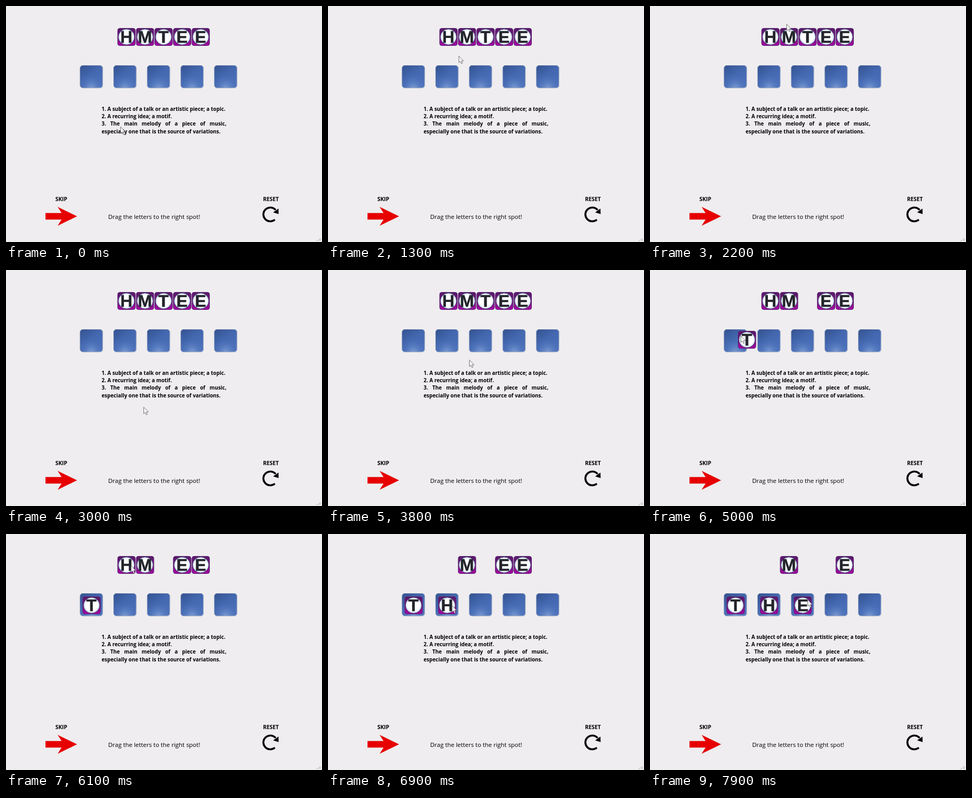
Write an HTML page that moves like this. It is 600 px wide and 450 px high and loops after 8 s.

```html
<!DOCTYPE html>
<html lang="en">
<head>
<meta charset="utf-8">
<title>Letter drag game</title>
<style>
  html, body { margin: 0; width: 100%; height: 100%; overflow: hidden; background: #efedef; }
  body { position: relative; font-family: "Open Sans", "Noto Sans", sans-serif; color: #000; }
  svg { position: absolute; left: 0; top: 0; display: block; }
  .clues { position: absolute; left: 181.5px; top: 189px; width: 237px; font-weight: 700; font-size: 9.9px; line-height: 14.2px; white-space: nowrap; }
  .wide { text-align: justify; text-align-last: justify; white-space: normal; }
  .label { font-weight: 700; font-size: 10.4px; text-anchor: middle; }
  .hint { font-size: 11.46px; }
  .glyph { font: 700 32px "Liberation Sans", Arial, sans-serif; text-anchor: middle; fill: #22252b; stroke: #22252b; stroke-width: .5; }
</style>
</head>
<body>
<svg width="600" height="450" viewBox="0 0 600 450">
  <defs>
    <linearGradient id="blue" x1="0" y1="0" x2=".7" y2="1">
      <stop offset="0" stop-color="#34528f"/>
      <stop offset=".5" stop-color="#4468b0"/>
      <stop offset="1" stop-color="#4a6fb9"/>
    </linearGradient>
    <radialGradient id="shine" cx=".5" cy="1" r=".62">
      <stop offset="0" stop-color="#86a3d8" stop-opacity=".85"/>
      <stop offset=".45" stop-color="#6488c8" stop-opacity=".5"/>
      <stop offset="1" stop-color="#4a6fb9" stop-opacity="0"/>
    </radialGradient>
    <linearGradient id="rim" x1="0" y1="0" x2="1" y2="1">
      <stop offset="0" stop-color="#5d76a8"/>
      <stop offset="1" stop-color="#9aabc9"/>
    </linearGradient>
    <linearGradient id="purple" x1="0" y1="0" x2="0" y2="1">
      <stop offset="0" stop-color="#571a68"/>
      <stop offset=".5" stop-color="#7c0c84"/>
      <stop offset="1" stop-color="#a207a2"/>
    </linearGradient>
    <radialGradient id="disc">
      <stop offset=".72" stop-color="#fff"/>
      <stop offset=".9" stop-color="#dfe9f6"/>
      <stop offset="1" stop-color="#9db4d6"/>
    </radialGradient>
    <g id="slot">
      <rect x=".5" y=".5" width="43.5" height="43.5" rx="5" fill="#c9ced9"/>
      <rect x=".5" y=".5" width="42.5" height="42.5" rx="5" fill="url(#blue)"/>
      <rect x=".5" y=".5" width="42.5" height="42.5" rx="5" fill="url(#shine)" stroke="url(#rim)"/>
    </g>
    <g id="tile">
      <rect x=".5" y=".5" width="33.5" height="33" rx="4" fill="url(#purple)" stroke="#5a2a72"/>
      <ellipse cx="17.2" cy="17" rx="15.5" ry="15.2" fill="url(#disc)" stroke="#43305f" stroke-width=".9"/>
    </g>
  </defs>

  <g id="slots"></g>
  <g id="tiles"></g>

  <text class="label" x="105" y="372.3">SKIP</text>
  <path d="M75 394.8H105.5L98 383L135 401L98 419L105.5 407.2H75Z" fill="#e60000"/>
  <text class="hint" x="194" y="406">Drag the letters to the right spot!</text>
  <text class="label" x="503" y="372.3">RESET</text>
  <path d="M510.5 407.4A13.2 13.2 0 1 1 512 388.9" fill="none" stroke="#000" stroke-width="3.6"/>
  <path d="M517.3 386.2L517.6 396.8L507.3 393.6Z"/>

  <path d="M596 443v5M593 446h5M590 447.5h3" stroke="#aaa9aa" stroke-width="1.6" stroke-dasharray="1.5 1.5"/>
</svg>
<div class="clues">
  <div>1. A subject of a talk or an artistic piece; a topic.</div>
  <div>2. A recurring idea; a motif.</div>
  <div class="wide">3. The main melody of a piece of music,</div>
  <div>especially one that is the source of variations.</div>
</div>
<svg width="600" height="450" viewBox="0 0 600 450">
  <path id="cursor" d="M.5 .5V13L3.3 10.4L5.3 15L7.4 14.1L5.4 9.7H9.3Z" fill="#fafafa" stroke="#555" stroke-width=".8"/>
</svg>
<script>
const LOOP = 8000, STEP = 100;
const $ = id => document.getElementById(id);
const slotX = i => 140.3 + i * 63.75;
const homeX = i => 211.5 + i * 35.25;
const HOME_Y = 42, SLOT_Y = 113;

// Pointer stops: time, x, y
const stops = [
  [0, 217, 230], [600, 231, 205], [1300, 248, 95], [1900, 240, 64],
  [2300, 262, 28], [3000, 261, 261], [3800, 268, 171], [4300, 287, 51],
  [4500, 287, 51], [5000, 172, 125], [5200, 151, 128], [5400, 151, 128],
  [5900, 237, 60], [6100, 237, 60], [6600, 235, 136], [6900, 235, 136],
  [7200, 343, 50], [7300, 343, 50], [7800, 299, 125], [8000, 299, 125]
];

// Which tile is dragged to which slot, and when
const drags = [
  { tile: 2, slot: 0, from: 4500, to: 5300 },
  { tile: 0, slot: 1, from: 6100, to: 6700 },
  { tile: 3, slot: 2, from: 7300, to: 7800 }
];

for (let i = 0; i < 5; i++)
  $("slots").innerHTML += `<use href="#slot" x="${slotX(i)}" y="${SLOT_Y}"/>`;

$("tiles").innerHTML = [..."HMTEE"].map(c =>
  `<g><use href="#tile"/><text class="glyph" x="17" y="28.2">${c}</text></g>`).join("");
const tiles = [...$("tiles").children];

function pointerAt(t) {
  const n = stops.findIndex(s => s[0] > t);
  const [t0, x0, y0] = stops[n - 1], [t1, x1, y1] = stops[n];
  const p = (t - t0) / (t1 - t0), e = p * p * (3 - 2 * p);
  return [Math.round(x0 + (x1 - x0) * e), Math.round(y0 + (y1 - y0) * e)];
}

function place(el, x, y) {
  el.setAttribute("transform", `translate(${x} ${y})`);
}

function draw(t) {
  const [x, y] = pointerAt(t);
  place($("cursor"), x, y);
  tiles.forEach((el, i) => place(el, homeX(i), HOME_Y));
  for (const d of drags) {
    if (t < d.from) continue;
    const el = tiles[d.tile];
    if (t >= d.to) {
      place(el, slotX(d.slot) + 5, SLOT_Y + 6);
    } else {
      const [gx, gy] = pointerAt(d.from);
      place(el, homeX(d.tile) + x - gx, HOME_Y + y - gy);
    }
  }
}

function tick() {
  const t = performance.now() % LOOP;
  draw(Math.floor(t / STEP) * STEP);
  requestAnimationFrame(tick);
}
tick();
</script>
</body>
</html>
```
